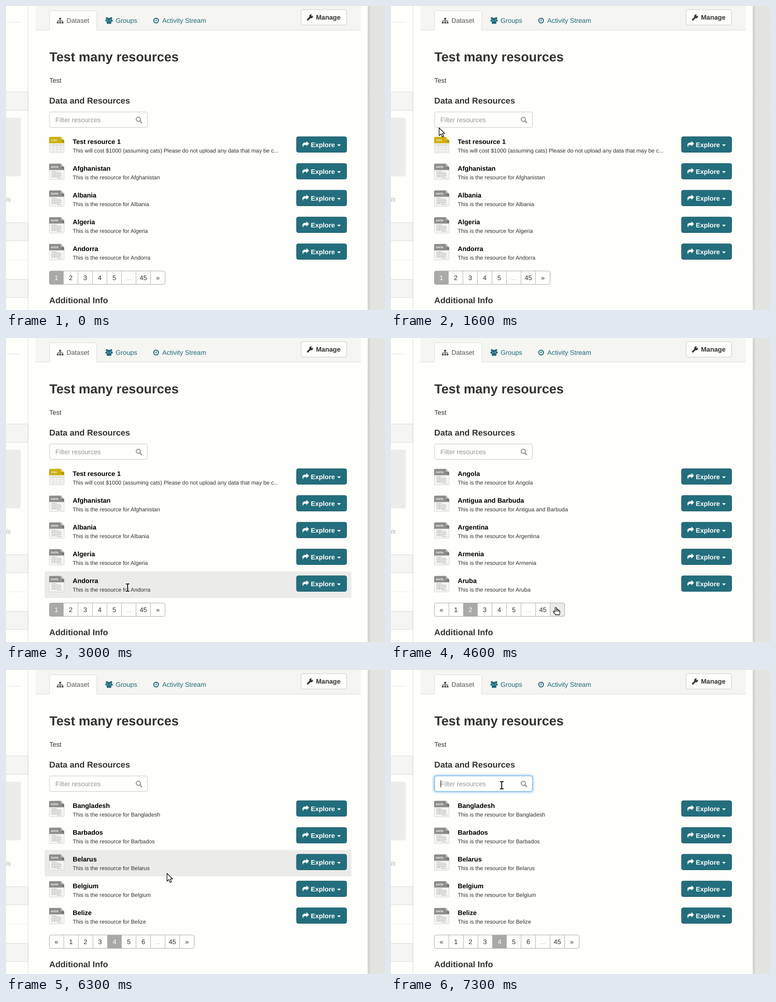
Write an HTML page that moves like this. It is 835 by 670 pixels and loops after 8 s.

```html
<!DOCTYPE html>
<html lang="en">
<head>
<meta charset="utf-8">
<title>Test many resources</title>
<style>
  html, body { margin: 0; width: 100%; height: 100%; overflow: hidden; background: #fefefb; }
  svg { display: block; }
  text { font: 14.5px "Liberation Sans", Arial, sans-serif; fill: #333; text-rendering: geometricPrecision; }
  .b { font-weight: bold; }
  .h1 { font-size: 28.7px; }
  .h3 { font-size: 18.5px; }
  .name { font-size: 14.45px; fill: #000; }
  .desc { font-size: 12.28px; }
  .link { fill: #206b7c; }
  .hint { fill: #989896; }
  .white { fill: #fefefb; }
  .tag { font-size: 6.3px; font-weight: bold; fill: #fff; }
  .mid { text-anchor: middle; }
  .line { fill: none; stroke: #d9dad6; }
  .hover { fill: #ebebe9; }
</style>
</head>
<body>
<svg width="835" height="670" viewBox="0 0 835 670">
  <defs>
    <filter id="grain" x="0" y="0" width="1" height="1">
      <feTurbulence type="fractalNoise" baseFrequency=".5" numOctaves="2" seed="4"/>
      <feColorMatrix values="0 0 0 0 .4  0 0 0 0 .4  0 0 0 0 .38  .25 0 0 0 -.09"/>
    </filter>
    <filter id="blur" x="-.1" y="-.5" width="1.2" height="2"><feGaussianBlur stdDeviation="2.2"/></filter>

    <g id="paper">
      <path d="M95.5 290v32q0 1.5 1.5 1.5h29.500q1.500 0 1.500-1.500v-26l-7-7.500z" fill="#f6f6f4" stroke="#d3d3d0"/>
      <path d="M95 302.500v-12q0-2 2-2h23.500l7.500 7v7z"/>
      <path d="M120.500 288.500v5.500q0 1.500 1.500 1.500h6z" fill="#fff" opacity=".35"/>
      <path d="M120 296h8v6z" fill="#000" opacity=".18"/>
    </g>
    <g id="data">
      <use href="#paper" fill="#8c8c8a"/>
      <path d="M100 305.500h12M100 308h20M100 310.500h23M100 313h21M100 315.500h23M100 318h18M113 320h11" stroke="#a9a9a7" stroke-width="1.100" stroke-dasharray="3.500 .7 5 .6 2 .7"/>
      <text x="99" y="298" class="tag">DATA</text>
    </g>
    <g id="csv">
      <use href="#paper" fill="#cdae0c"/>
      <path d="M97 304.500h30v3h-30z" fill="#e4e2d4"/>
      <path d="M97 308h30M97 312h30M97 316h30M97 320h30M104 304v18M112 304v18M120 304v18" stroke="#dadad5" stroke-width=".9"/>
      <text x="99.500" y="298" class="tag">CSV</text>
    </g>
    <g id="explore">
      <rect x="640" y="288" width="110.500" height="34.500" rx="4" fill="#236e7d" stroke="#1a5c69"/>
      <path d="M667.600 303.300l-5.800-5.500v3.100h-1.800c-5 0-7 2.400-7 5.700 0 2.200 1 3.900 2 5.100-.7-4 .6-5.500 5-5.500h1.800v3z" class="white"/>
      <text x="671.500" y="310.500" class="b white">Explore</text>
      <path d="M729.300 305h8.400l-4.200 4.300z" class="white"/>
    </g>

    <path id="arrow" d="M0 .5V17.800L4.200 14 7 20.600 10 19.300 7.200 12.900H12.400z" fill="#fff" stroke="#111" stroke-width="1.400" stroke-linejoin="round"/>
    <g id="beam" fill="none" stroke-linecap="square">
      <path id="bar" d="M-3-8h1.500Q0-8 0-6.500V6.500Q0 8-1.500 8H-3M3-8H1.500Q0-8 0-6.500M0 6.500Q0 8 1.500 8H3" stroke="#fff" stroke-width="4"/>
      <path d="M-3-8h1.500Q0-8 0-6.500V6.500Q0 8-1.500 8H-3M3-8H1.500Q0-8 0-6.500M0 6.500Q0 8 1.500 8H3" stroke="#111" stroke-width="2"/>
    </g>
    <path id="hand" d="M-1.500 9.500V1.200Q-1.500-.3 0-.3T1.500 1.200V5.500Q3-.0 4.300 5.800 5.900 4.300 6.800 6.600 8.900 5.700 9 8.200V12.500L7.800 16H0L-4.300 11Q-6.600 8.300-4.500 8-3.200 7.900-1.500 9.500zM1.500 6v3M4.300 6.500v2.500M6.800 7v2.500" fill="#fff" stroke="#111" stroke-width="1.300" stroke-linejoin="round"/>
  </defs>

  <rect width="835" height="670" fill="#fefefb"/>

  <!-- sidebar and page edge -->
  <g fill="#f5f5f3" stroke="#d9dad6">
    <path d="M-1 189.500h49v40.500h-49zM-1 477.500h49v40h-49zM-1 602.500h49v40h-49z"/>
  </g>
  <path d="M48.500 0v670" class="line"/>
  <path d="M0 35.500h33" class="line" opacity=".7"/>
  <path d="M0 559.500h48" class="line" stroke-dasharray="1 1"/>
  <path d="M0 246h28.500q4 0 4 4v121.500q0 4-4 4H0z" fill="#ececea"/>
  <text x="0" y="430.500" font-style="italic" class="hint" opacity=".8" style="font-style:italic">is</text>
  <rect x="798" width="37" height="670" fill="#e4e4e1"/>
  <rect x="802" width="33" height="670" filter="url(#grain)" opacity=".55"/>
  <rect x="797" width="5" height="670" fill="#d5d5d2"/>
  <path d="M797.500 0v670" stroke="#c9c9c7"/>

  <!-- tabs -->
  <rect x="64.500" width="717.500" height="53" fill="#f5f5f2"/>
  <path d="M64.500 53h717.500" class="line"/>
  <path d="M96 54V14.500q0-4 4-4h96q4 0 4 4V54" fill="#fefefb"/>
  <path d="M96 53V14.500q0-4 4-4h96q4 0 4 4V53" class="line"/>
  <g fill="#555" stroke="#555">
    <path d="M117 26h4.500v4h-4.500zM112 34.500h4v4h-4zM117.300 34.500h4v4h-4zM122.500 34.500h4v4h-4z" stroke="none"/>
    <path d="M119.300 30v4.500M114 34.500V32.300h10.500v2.200" fill="none" stroke-width="1.200"/>
  </g>
  <text x="133.300" y="37.200" style="fill:#555">Dataset</text>
  <g class="link">
    <circle cx="222.300" cy="27" r="2.400"/><circle cx="231.700" cy="27" r="2.400"/>
    <path d="M219 34v-2q0-2.500 2-2.500h3l-1 4.500zM235 34v-2q0-2.500-2-2.500h-3l1 4.500z"/>
    <circle cx="227" cy="29.300" r="3.300"/>
    <path d="M221.700 37q0-4.500 3-4.500h4.600q3 0 3 4.500 0 2.300-2 2.300h-6.600q-2 0-2-2.300z"/>
  </g>
  <text x="241.500" y="37.200" class="link">Groups</text>
  <g fill="none" stroke="#206b7c"><circle cx="330.700" cy="32" r="5.300" stroke-width="2"/><path d="M331.300 28.700v3.800h-3" stroke-width="1.300"/></g>
  <text x="344.300" y="37.200" class="link">Activity Stream</text>
  <rect x="650" y="8" width="100.500" height="34" rx="4" fill="#fefefb" stroke="#c8c9c6"/>
  <path d="M664.800 30.200l6-6" stroke="#333" stroke-width="3.600" stroke-linecap="round"/>
  <circle cx="672.300" cy="22.700" r="4.200" fill="#333"/>
  <path d="M673.200 21.800l4-4" stroke="#fefefb" stroke-width="3"/>
  <text x="683" y="30" class="b">Manage</text>

  <!-- headings and filter -->
  <text x="95.500" y="122" class="b h1">Test many resources</text>
  <text x="95.500" y="169">Test</text>
  <text x="95.300" y="215.300" class="b h3">Data and Resources</text>
  <text x="95.300" y="655" class="b h3">Additional Info</text>
  <rect id="glow" x="95" y="233" width="217" height="35" rx="5" fill="none" stroke="#52a8ec" stroke-width="4" filter="url(#blur)"/>
  <rect x="96" y="233.500" width="215.500" height="34" rx="4" fill="#fefefb" stroke="#c6c6c4"/>
  <rect id="ring" x="96" y="233.500" width="215.500" height="34" rx="4" fill="none" stroke="#62ade0"/>
  <text x="108.800" y="256" class="hint">Filter resources</text>
  <g fill="none" stroke="#989896"><circle cx="291.500" cy="249.700" r="4.600" stroke-width="2.200"/><path d="M295 253.300l3.600 3.600" stroke-width="2.800" stroke-linecap="round"/></g>
  <path id="caret" d="M109.500 242.500v16.500" stroke="#222"/>

  <g id="rows"></g>
  <g id="pager"></g>
  <use id="cursor"/>
</svg>
<script>
const $ = id => document.getElementById(id);
const LOOP = 8000, STEP = 100, PITCH = 59, TOP = 278.5, CELL = 32;

const pages = [
  ["Test resource 1", "Afghanistan", "Albania", "Algeria", "Andorra"],
  ["Angola", "Antigua and Barbuda", "Argentina", "Armenia", "Aruba"],
  ["Australia", "Austria", "Azerbaijan", "Bahamas", "Bahrain"],
  ["Bangladesh", "Barbados", "Belarus", "Belgium", "Belize"]
];
const intro = "This will cost $1000 (assuming cats) Please do not upload any data that may be c...";
const clicks = [3900, 4700, 5300];
const focusAt = 7100;

// Pointer path: time, x, y
const path = [
  [500, 330, 86], [900, 235, 200], [1200, 158, 284], [1300, 140, 298], [1600, 106, 268],
  [1700, 112, 290], [2000, 170, 336], [2200, 212, 372], [2300, 220, 397], [2600, 235, 450],
  [3000, 268, 550], [3100, 285, 566], [3200, 305, 580], [3500, 334, 596], [4100, 334, 596],
  [4300, 346, 595], [4600, 363, 594], [4800, 363, 594], [5100, 378, 595], [5800, 378, 595],
  [5900, 377, 579], [6200, 364, 490], [6500, 336, 363], [6600, 325, 325], [6700, 308, 298],
  [6800, 286, 273], [6900, 265, 259], [7100, 244, 254], [LOOP, 244, 254]
];

function pointer(t) {
  const i = path.findIndex(p => p[0] > t);
  if (i < 1) return null;
  const [t0, x0, y0] = path[i - 1], [t1, x1, y1] = path[i];
  const k = (t - t0) / (t1 - t0);
  return { x: x0 + (x1 - x0) * k, y: y0 + (y1 - y0) * k };
}

function shape({ x, y }, row) {
  if (y > 584) return "hand";
  if (y > 233 && y < 267 && x < 311) return "beam";
  const dy = y - TOP - row * PITCH;
  return row >= 0 && dy > 32 && dy < 48 && x > 147 && x < 320 ? "beam" : "arrow";
}

function rowsHtml(page, hot) {
  return pages[page].map((name, i) => {
    const first = !page && !i;
    return `<g transform="translate(0 ${i * PITCH})">` +
      (i === hot ? `<rect x="85" y="${TOP}" width="676" height="58.5" rx="3" class="hover"/>` : "") +
      `<use href="#${first ? "csv" : "data"}"/><use href="#explore"/>` +
      `<text x="147" y="304" class="b name">${name}</text>` +
      `<text x="147" y="322.7" class="desc">${first ? intro : "This is the resource for " + name}</text></g>`;
  }).join("");
}

function pagerHtml(page, pos) {
  const count = Math.max(5, page + 3);
  const cells = [...Array(count).keys()].map(n => n + 1).concat("...", 45, "»");
  if (page) cells.unshift("«");
  const active = page ? page + 1 : 0;
  const edge = i => 95.5 + CELL * i - (i > active ? 1 : 0);
  const end = edge(cells.length);
  let fills = "", lines = "", labels = "";
  cells.forEach((label, i) => {
    const x = edge(i), w = edge(i + 1) - x;
    const over = pos && pos.y > 584 && pos.x >= x && pos.x < x + w;
    if (i === active) fills += `<rect x="${x}" y="584" width="${w}" height="29.5" rx="${i ? 0 : 3}" fill="#a9a9a6"/>`;
    else if (over) fills += `<rect x="${x}" y="584" width="${w}" height="29.5" class="hover"/>`;
    if (i) lines += `M${x} 584v29.5`;
    const color = i === active ? "#fefefb" : label === "..." ? "#b5b5b3" : "#333";
    labels += `<text x="${x + (i > active ? 16 : 15.5)}" y="604.3" class="mid" style="fill:${color}">${label}</text>`;
  });
  return fills + `<path d="${lines}" stroke="#b0b0ae"/>` +
    `<rect x="95.5" y="584" width="${end - 95.5}" height="29.5" rx="4" fill="none" stroke="#a6a6a4"/>` + labels;
}

function draw(t) {
  const page = clicks.filter(c => t >= c).length;
  const pos = pointer(t);
  let row = pos ? Math.floor((pos.y - TOP) / PITCH) : -1;
  if (row > 4) row = -1;
  $("rows").innerHTML = rowsHtml(page, row);
  $("pager").innerHTML = pagerHtml(page, pos);

  const focus = Math.min(1, Math.max(0, (t - focusAt + STEP) / 300));
  $("glow").style.opacity = focus * 0.6;
  $("ring").style.opacity = focus;
  $("caret").style.opacity = t >= focusAt ? 1 : 0;

  const cursor = $("cursor");
  cursor.style.display = pos ? "" : "none";
  if (pos) {
    cursor.setAttribute("href", "#" + shape(pos, row));
    cursor.setAttribute("transform", `translate(${pos.x} ${pos.y})`);
  }
}

const start = performance.now();
let last = -1;
function tick() {
  const t = Math.floor((performance.now() - start) % LOOP / STEP) * STEP;
  if (t !== last) draw(last = t);
  requestAnimationFrame(tick);
}
tick();
</script>
</body>
</html>
```
